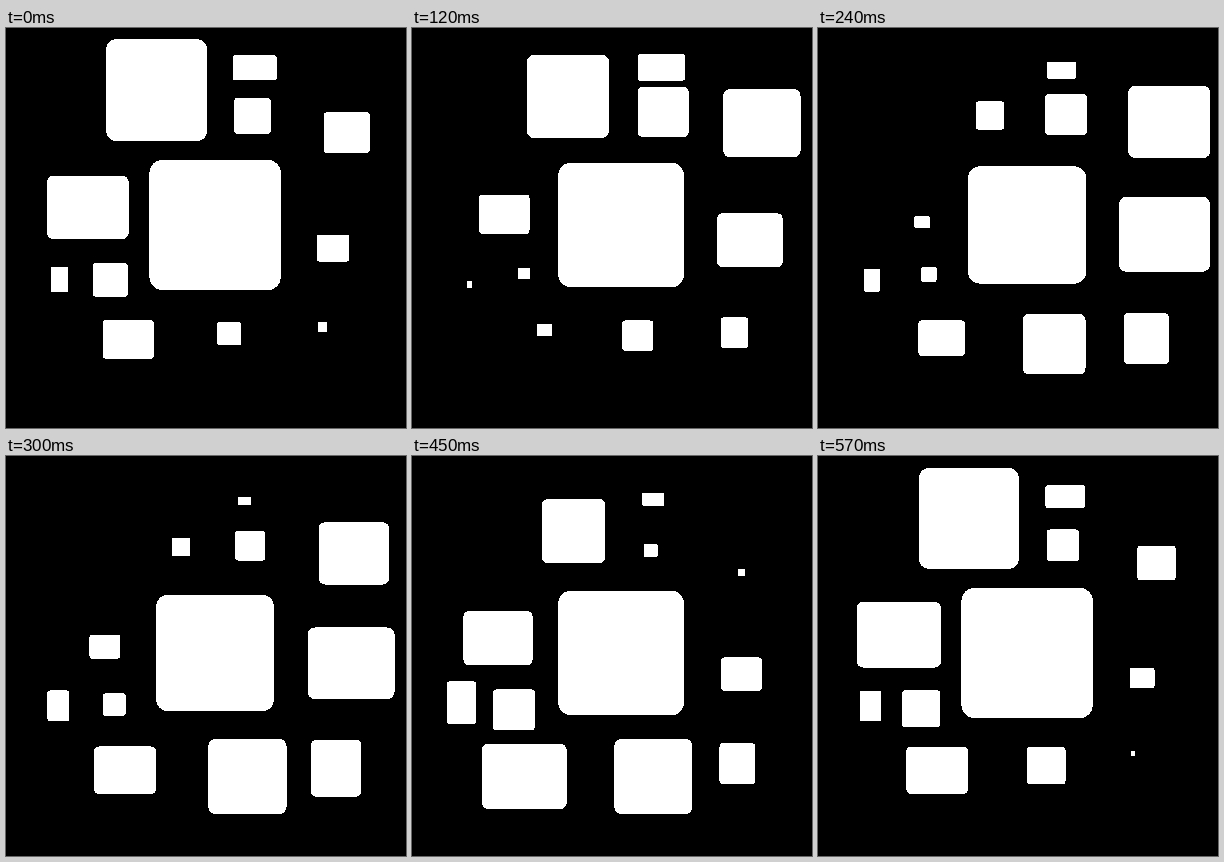
Recreate the animation shown at these times as an HTML page. Size 400 by 400 pixels, loop 600 ms.

```html
<!DOCTYPE html>
<html lang="en">
<head>
<meta charset="utf-8">
<title>Pulsing tiles</title>
<style>
  html, body { margin: 0; width: 100%; height: 100%; overflow: hidden; background: #000; }
  svg { display: block; width: 100%; height: 100%; fill: #fff; shape-rendering: crispEdges; }
</style>
</head>
<body>
<svg id="stage" viewBox="0 0 400 400"></svg>
<script>
const STEP = 30, STEPS = 20;
const stage = document.getElementById('stage');

// Share of a tile that lies behind its anchor, across and down
const FLAT = [0.165, 0.215], STEEP = [0.207, 0.156], CENTRE = [0.5, 0.5];

// A tile grows from its anchor (x, y); the signs of w and h give the direction
function addTile(x, y, w, h, [backX, backY] = FLAT) {
  const el = document.createElementNS('http://www.w3.org/2000/svg', 'rect');
  const width = Math.abs(w), height = Math.abs(h);
  const attrs = {
    x: -width * (w > 0 ? backX : 1 - backX),
    y: -height * (h > 0 ? backY : 1 - backY),
    width, height,
    rx: Math.min(width, height) * 0.1
  };
  for (const name in attrs) el.setAttribute(name, attrs[name]);
  stage.append(el);
  return s => el.setAttribute('transform', `translate(${x} ${y}) scale(${s})`);
}

// Ten spots clockwise around the hub
const ring = [
  [addTile(180.2, 97.2, -101, -102, STEEP)],
  [addTile(233.8, 47, 49, -28)],
  [addTile(234.1, 98.2, 51, -50)],
  [addTile(327.2, 118.8, 86, -76, STEEP)],
  [addTile(316, 227.7, 91, -75)],
  [addTile(313.4, 296, 50, 57)],
  [addTile(215.2, 299, 87, 84)],
  [addTile(137.2, 297.9, -86, 66, STEEP), addTile(59.5, 258.8, -30, -43)],
  [addTile(116, 242.2, -42.5, 41.5)],
  [addTile(109.2, 197.5, -85.5, -66.5)]
];
const scaleHub = addTile(209.1, 197, 124.4, 123.4, CENTRE);

// Steady growth, then an accelerating shrink
function pulse(u) {
  return u < 11 ? 0.09 * (u + 1) : 1 - 0.0113 * (u - 11) ** 2;
}

function draw(now) {
  const k = Math.floor(Math.max(0, now - start) / STEP) % STEPS;
  ring.forEach((spot, i) => {
    const lag = i * STEPS / ring.length;
    const size = pulse((k + 11 - lag + STEPS) % STEPS);
    spot.forEach(scaleTile => scaleTile(size));
  });
  scaleHub(1 + 0.056 * Math.cos((k + 0.5) / STEPS * 2 * Math.PI));
  requestAnimationFrame(draw);
}

const start = performance.now();
draw(start);
</script>
</body>
</html>
```
